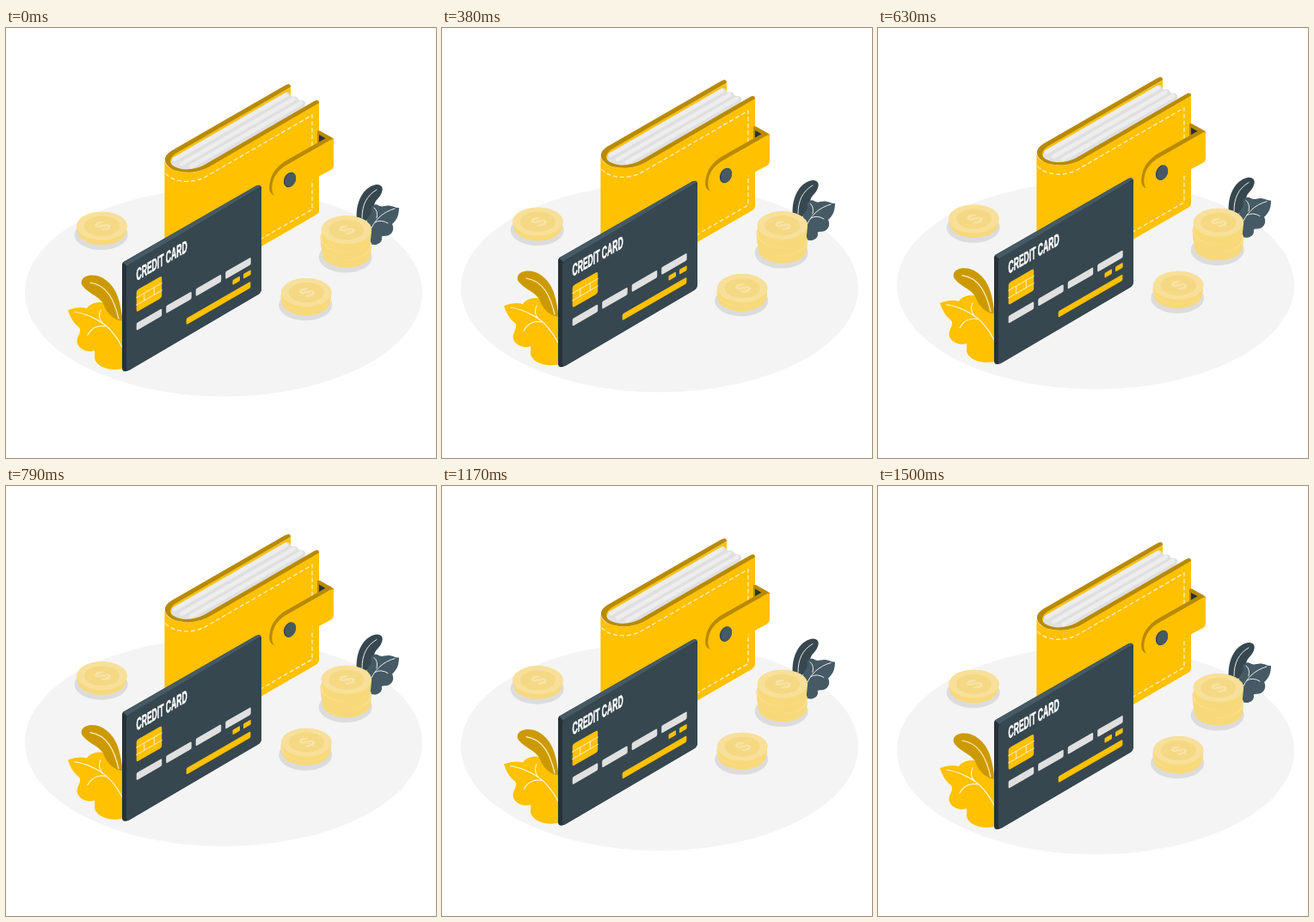
These frames come from a looping animation (500 by 500 pixels, 1540 ms). An HTML page with a canvas:

```html
<!DOCTYPE html>
<html lang="en">
<head>
<meta charset="utf-8">
<title>Wallet and card</title>
<style>
html, body { margin: 0; width: 100%; height: 100%; overflow: hidden; background: #fff; }
canvas { display: block; width: 500px; height: 500px; }
</style>
</head>
<body>
<canvas id="stage"></canvas>
<script>
const LOOP = 1540;
const STEP = 1000 / 24;
const FLOAT_PERIOD = 1500;
const RISE = 10;
const ISO = 0.577;

const YELLOW = '#ffc100', BROWN = '#b88a00', OCHRE = '#cc9a00';
const SLATE = '#37474f', SLATE_LIGHT = '#455a64', SLATE_DARK = '#263238';
const GOLD = { face: '#f8e09a', inner: '#f4d884', side: '#f8d97a', mark: '#f9e4a8' };

const canvas = document.getElementById('stage');
const ctx = canvas.getContext('2d');
const ratio = window.devicePixelRatio || 1;
canvas.width = canvas.height = 500 * ratio;

function fill(d, color) {
  ctx.fillStyle = color;
  ctx.fill(new Path2D(d));
}

function line(d, color, width, dash = []) {
  ctx.strokeStyle = color;
  ctx.lineWidth = width;
  ctx.lineCap = dash.length ? 'butt' : 'round';
  ctx.setLineDash(dash);
  ctx.stroke(new Path2D(d));
}

function ellipse(x, y, rx, ry, color, angle = 0) {
  ctx.fillStyle = color;
  ctx.beginPath();
  ctx.ellipse(x, y, rx, ry, angle, 0, Math.PI * 2);
  ctx.fill();
}

// Runs a drawing routine in a skewed plane whose origin is (x, y).
function inPlane(a, b, c, d, x, y, draw) {
  ctx.save();
  ctx.transform(a, b, c, d, x, y);
  draw();
  ctx.restore();
}

function coin(x, y, thickness) {
  const rx = 29.2, ry = 16.4;
  ctx.fillStyle = GOLD.side;
  ctx.beginPath();
  ctx.ellipse(x, y + thickness, rx - 0.8, ry, 0, 0, Math.PI);
  ctx.ellipse(x, y, rx, ry, 0, Math.PI, Math.PI * 2);
  ctx.fill();
  ellipse(x, y, rx, ry, GOLD.face);
  ellipse(x, y, 20.5, 11.6, GOLD.inner);
}

function coinStack(x, y, shifts, thickness) {
  const base = y + shifts.length * thickness;
  ellipse(x - 0.8, base + 4.3, 31, 18, '#dcdcdc');
  for (let i = shifts.length - 1; i >= 0; i--) {
    coin(x + shifts[i], y + i * thickness, thickness);
  }
  inPlane(0.87, -0.5, 0.87, 0.5, x + 1, y, () => {
    ctx.fillStyle = GOLD.mark;
    ctx.font = 'bold 22px "Liberation Sans", sans-serif';
    ctx.textAlign = 'center';
    ctx.textBaseline = 'alphabetic';
    ctx.fillText('$', 0, 7.5);
  });
}

function leftLeaves() {
  fill(`M72 328 C80 325 88 324 94 326 C98 319 111 317 118 321 C127 325 132 332 137 338
        V396 C124 399 109 396 104 387 C102 382 104 379 103 375 C95 378 86 374 83 367
        C81 360 87 356 86 350 C85 346 78 346 72 328Z`, YELLOW);
  line('M80 330 C98 333 115 343 123 353 Q130 361 135 371', '#fff4cf', 1.2);
  line('M110 328 Q106 336 112 343 M95 357 C100 348 108 345 116 347', '#fff4cf', 1.2);
  fill(`M88 294 C90 286 106 285 116 293 C131 304 133 322 136 341 C126 340 119 333 115 325
        C112 313 98 310 91 302 C88 299 87 297 88 294Z`, OCHRE);
  line('M98 296 C118 299 126 317 131 338', '#fff1c4', 1.2);
}

function rightLeaves() {
  fill(`M408 224 C406 206 413 188 427 183 C434 180 440 184 437 191 C435 198 429 199 428 207
        C427 216 421 224 414 228Z`, SLATE);
  line('M431 188 C419 195 414 206 414 221', '#e8ebed', 1);
  fill(`M457 209 C451 209 448 205 440 207 C434 209 432 203 427 206 C422 209 427 214 423 218
        C416 226 419 242 424 251 C430 254 437 250 437 245 C436 240 440 243 445 241
        C451 238 451 232 449 228 C454 224 457 218 457 209Z`, SLATE_LIGHT);
  line('M452 210 C438 214 428 223 422 239 M428 209 Q433 213 431 221 M444 227 Q436 222 429 226',
    '#e8ebed', 1);
}

function pages() {
  fill(`M326 76 L196 151 C189 155 191 161 199 163.5 C211 167 222 165 231 160
        L346 93 L348 87Z`, '#e2e2e2');
  [[326.5, 79, 197], [335.5, 83.7, 205], [344, 88.2, 216]].forEach(([x, y, end]) => {
    const stripe = `M${x} ${y} L${end} ${y + (x - end) * ISO}`;
    line(stripe, '#dfdfdf', 8.5);
    inPlane(1, 0, 0, 1, -1, -1, () => line(stripe, '#ededed', 4.8));
  });
}

function clasp() {
  fill('M362 119.5 L365 119.5 L379 127.5 Q381 129 381 132 L364 140 L362 140Z', BROWN);
  fill('M364 124 L372 128.6 L364 133.3Z', SLATE_DARK);
  fill(`M374.5 125 L381 129 L381 134 L326 187 L314 195 C306 194 305 187 307 179
        C309 168 316 160 326 154 L372 128Z`, BROWN);
  fill(`M378 129.8 Q381 128.5 381 131 V160 Q381 163 378 165 L322 194.5
        C313 198 309 194 309.3 185 C310 173 317 164 328 158.3Z`, YELLOW);
  ellipse(330, 176.5, 6.7, 9.2, SLATE, 0.42);
  ellipse(330.8, 176.4, 5.8, 8.5, SLATE_LIGHT, 0.42);
}

function wallet() {
  fill('M331 69 V79 L206 157 L190 159 V149Z', YELLOW);
  pages();
  fill(`M184.4 154 C186 164 200 168 212 168 C222 168 230 165 236 161 L364 87
        V212 Q364 215 361 217 L210 304 L184.4 304Z`, YELLOW);
  fill(`M324 67 Q331 63 331 68.8 L197 146 C190 151 189 157 195 160.8 C205 166.5 220 165 230 159.5
        L358 85.3 Q364 82 364 87.2 L236 161.5 C222 169.5 204 169.5 193 164
        C182.5 158 182 149 192 143Z`, BROWN);
  line('M185.5 169 C193 178.5 214 182.5 232 173 L356 101.3 V211 L290 249', '#fff3cc', 1.2, [5, 3]);
  clasp();
}

function cardBar(x, y, w, h, color, radius = 1.6) {
  inPlane(1, -ISO, 0, 1, x, y, () => {
    ctx.fillStyle = color;
    ctx.beginPath();
    ctx.roundRect(0, 0, w, h, radius);
    ctx.fill();
  });
}

function card() {
  fill(`M137 271.8 L291 183.5 Q297 181 297 187 V303 Q297 307.5 293 310 L143 398
        Q135 401.5 135 395 V275 Q135 273 137 271.8Z`, SLATE_DARK);
  fill('M136 272.5 L291 183.5 Q295 181.5 296.5 184.5 L141 277Z', SLATE_LIGHT);
  fill(`M143 275 L293 187 Q297 184.5 297 189 V303 Q297 307.5 293 310 L144 397.5
        Q140 399.5 140 395 V280 Q140 277 143 275Z`, SLATE);

  inPlane(0.44, -0.44 * ISO, 0, 1, 151.5, 294, () => {
    ctx.fillStyle = ctx.strokeStyle = '#fff';
    ctx.lineWidth = 0.7;
    ctx.setLineDash([]);
    ctx.font = 'bold 19.5px "Liberation Sans", Arial, sans-serif';
    ctx.textAlign = 'left';
    ctx.textBaseline = 'alphabetic';
    ctx.fillText('CREDIT CARD', 0, 0);
    ctx.strokeText('CREDIT CARD', 0, 0);
  });

  cardBar(151.7, 305, 29.5, 25.5, YELLOW, 2.5);
  inPlane(1, -ISO, 0, 1, 151.7, 305, () => {
    line('M0 8.5 H29.5 M0 17 H29.5 M9 8.5 V17 M20.5 8.5 V17', '#fff0c4', 1);
  });

  for (let i = 0; i < 4; i++) {
    const x = 151.7 + i * 34.5;
    cardBar(x, 343.2 - i * 34.5 * ISO, 29.5, 8.7, '#e0e0e0');
  }
  cardBar(263.5, 293.2, 8.5, 5.8, YELLOW, 1.2);
  cardBar(276, 286, 8.7, 5.8, YELLOW, 1.2);
  cardBar(209.7, 337.7, 74.7, 7.4, YELLOW);
}

function scene() {
  ellipse(253, 307.5, 231, 121, '#f4f4f4');
  leftLeaves();
  rightLeaves();
  coinStack(111.5, 230.2, [0], 5.6);
  coinStack(395.5, 234.6, [0.4, -0.8, 0.4], 9.2);
  coinStack(349, 307.5, [0.3, -0.3], 5.2);
  wallet();
  card();
}

function render(now) {
  const step = Math.floor((now % LOOP + 5) / STEP);
  const phase = (step * STEP / FLOAT_PERIOD) % 1;
  const lift = RISE * (1 - Math.abs(1 - 2 * phase));
  ctx.setTransform(ratio, 0, 0, ratio, 0, 0);
  ctx.fillStyle = '#fff';
  ctx.fillRect(0, 0, 500, 500);
  ctx.translate(0, -lift);
  scene();
}

let start;
function tick(now) {
  start ??= now;
  render(now - start);
  requestAnimationFrame(tick);
}
render(0);
requestAnimationFrame(tick);
</script>
</body>
</html>
```
